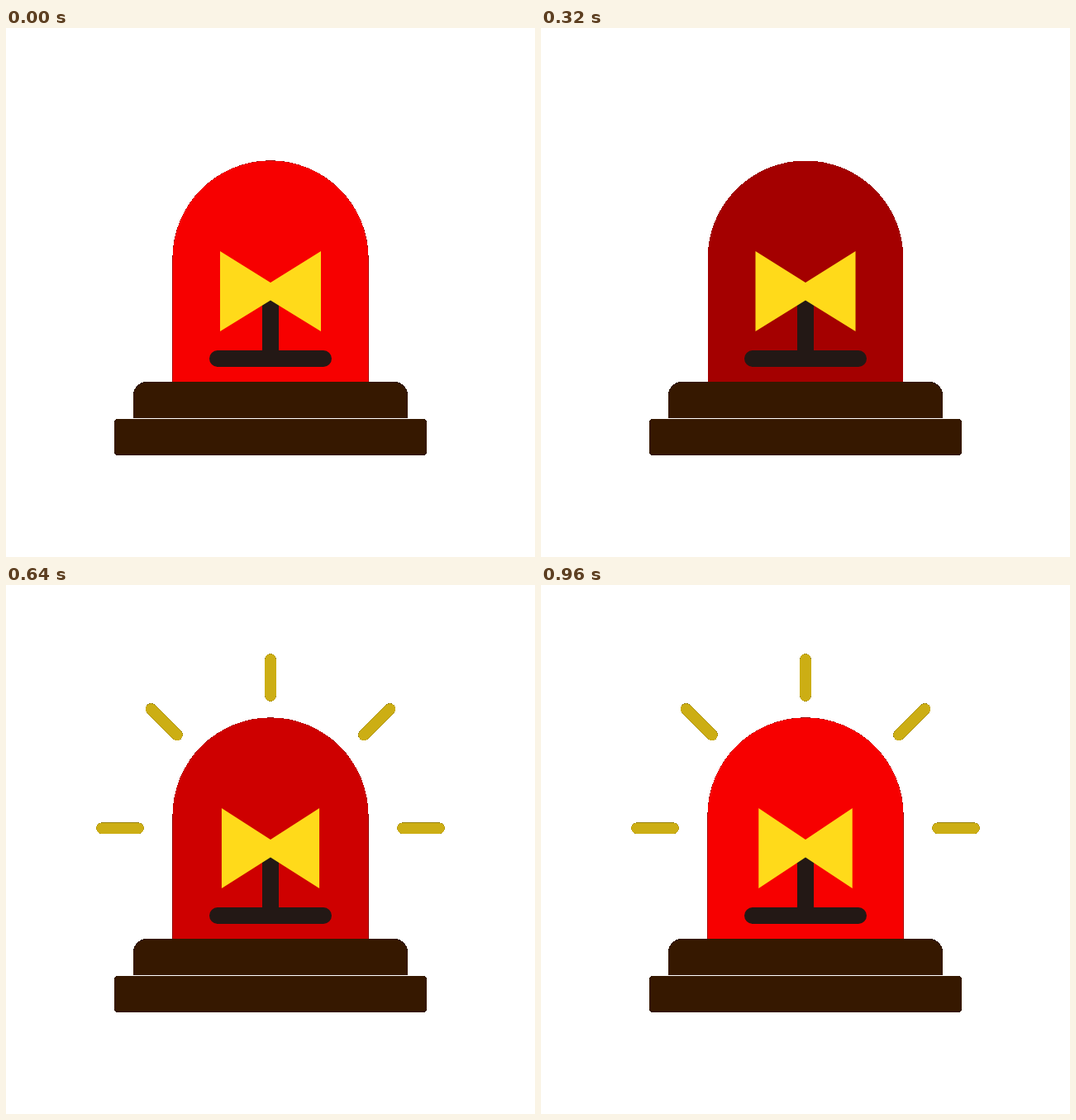
Animation of 640x640 px, one loop 1 s. Source, as an HTML page:

```html
<!DOCTYPE html>
<html lang="en">
<head>
<meta charset="utf-8">
<title>Siren</title>
<style>
  html, body { margin: 0; width: 100%; height: 100%; overflow: hidden; background: #fff; }
  svg { display: block; width: 100%; height: 100%; }
  .round { fill: none; stroke-linecap: round; }
</style>
</head>
<body>
<svg viewBox="0 0 640 640">
  <!-- Hard silhouette: soft edges fall on black, faint ones vanish -->
  <filter id="hard" filterUnits="userSpaceOnUse" x="0" y="0" width="640" height="640" color-interpolation-filters="sRGB">
    <feComponentTransfer in="SourceAlpha" result="mask">
      <feFuncA type="discrete" tableValues="0 1"/>
    </feComponentTransfer>
    <feComposite in="SourceGraphic" in2="mask" operator="in" result="kept"/>
    <feMerge>
      <feMergeNode in="mask"/>
      <feMergeNode in="kept"/>
    </feMerge>
  </filter>
  <g filter="url(#hard)">
    <path id="rays" class="round" stroke="#ffda1a" stroke-width="14"
      d="M320 90V134M116 294.3H160M480 294.3H524M175.5 150L207 181.5M464.5 150L433 181.5"/>
    <path id="dome" fill="#f70000" d="M201.3 428V279a118.7 118.7 0 0 1 237.4 0V428Z"/>
    <path class="round" stroke="#231815" stroke-width="20" d="M256 400H384M320 329V400"/>
    <path id="bow" fill="#ffda1a" d="M-61 270L0 308L61 270V367L0 329.5L-61 367Z"/>
    <path fill="#361800" d="M154 472V444a16 16 0 0 1 16-16H470a16 16 0 0 1 16 16V472Z"/>
    <rect fill="#361800" x="131" y="473" width="378" height="44" rx="4"/>
  </g>
</svg>
<script>
  const LOOP = 1000, STEP = 40;
  const [rays, dome, bow] = ["rays", "dome", "bow"].map(id => document.getElementById(id));

  // Rises from 0 to 1 and falls back once per period
  const triangle = (t, period) => 1 - Math.abs(1 - 2 * (t % period) / period);

  function draw(time) {
    const t = Math.floor(time % LOOP / STEP) * STEP;
    const turn = Math.abs(Math.cos(3 * Math.PI * t / LOOP));
    const dim = t < 800 ? triangle(t, 800) : 0;

    rays.setAttribute("opacity", triangle(t, 400));
    dome.setAttribute("opacity", 1 - 0.415 * dim);
    bow.setAttribute("transform", `translate(320 0) scale(${turn} 1)`);
  }

  const start = performance.now();
  function tick() {
    draw(performance.now() - start);
    requestAnimationFrame(tick);
  }
  tick();
</script>
</body>
</html>
```
